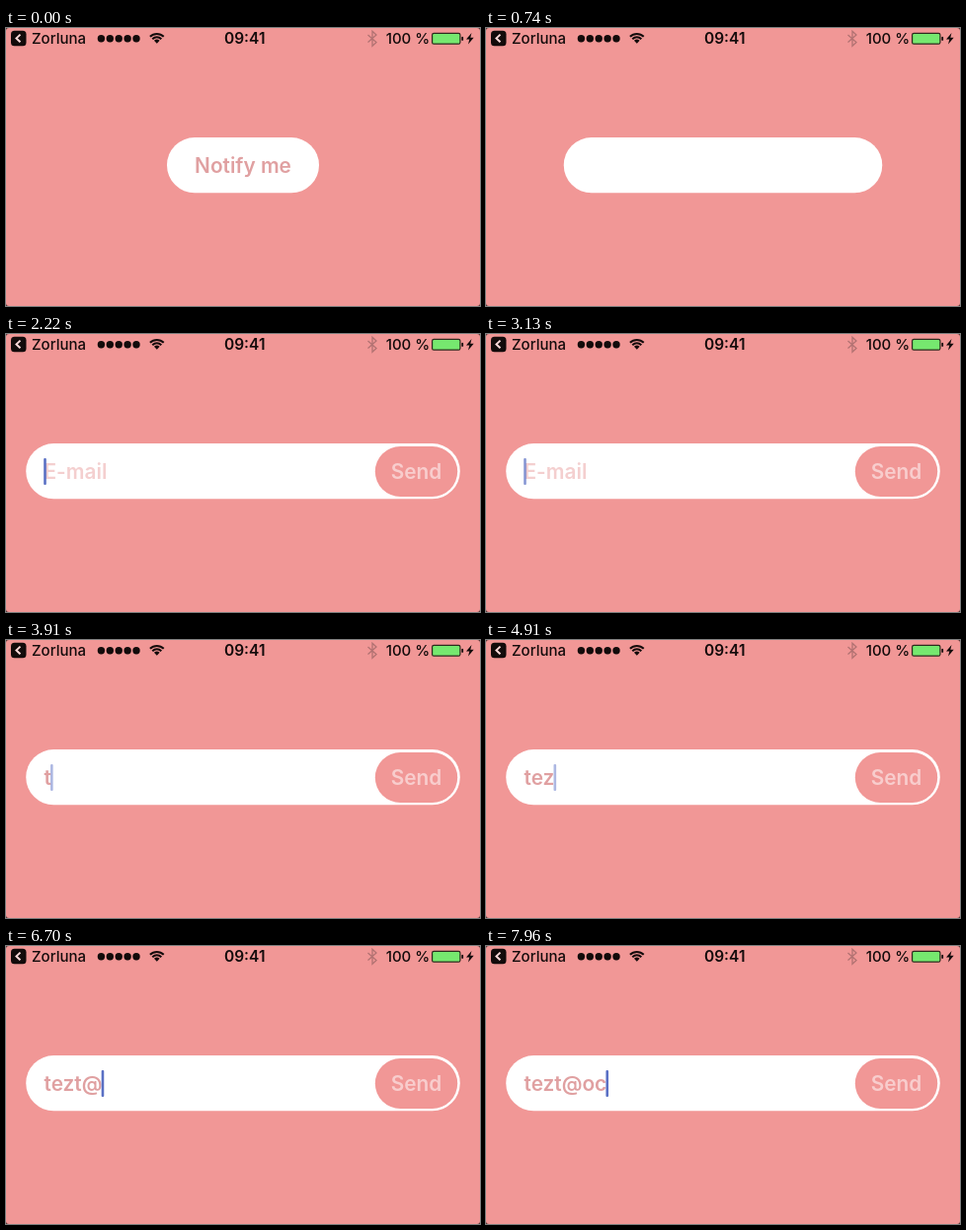
Write an HTML page with a canvas that moves like this. It is 480 px wide and 282 px high and loops after 8000 ms.

```html
<!DOCTYPE html>
<html lang="en">
<head>
<meta charset="utf-8">
<title>Notify me</title>
<style>
  html, body { margin: 0; width: 100%; height: 100%; overflow: hidden; background: #4a3030; }
  canvas { display: block; }
</style>
</head>
<body>
<canvas id="stage" width="480" height="282"></canvas>
<script>
const ctx = document.getElementById('stage').getContext('2d');
const LOOP = 8000;
const PINK = '#f19796';
const TEXT_PINK = '#e0a0a1';
const INK = '#130b0b';
const FIELD_X = 38.5;
const BASELINE = 147;
const FOCUS_TIME = 1250;

// Time of each keystroke and the character it adds
const KEYS = [[3360, 't'], [4190, 'e'], [4360, 'z'], [5200, 't'], [6270, '@'], [7000, 'o'], [7550, 'c']];

const progress = (t, from, to) => Math.min(1, Math.max(0, (t - from) / (to - from)));
const ease = p => p * p * (3 - 2 * p);
const mix = (a, b, p) => a + (b - a) * p;

function box(x, y, w, h, r, color) {
  ctx.beginPath();
  ctx.roundRect(x, y, w, h, r);
  ctx.fillStyle = color;
  ctx.fill();
}

function line(points, color, width) {
  ctx.beginPath();
  points.forEach(([x, y]) => ctx.lineTo(x, y));
  ctx.strokeStyle = color;
  ctx.lineWidth = width;
  ctx.stroke();
}

function label(text, x, y, size, weight, color, align = 'left') {
  ctx.font = `${weight} ${size}px Inter, sans-serif`;
  ctx.textAlign = align;
  ctx.fillStyle = color;
  ctx.fillText(text, x, y);
}

const formText = (text, x, y, color, align) => label(text, x, y, 20.8, 600, color, align);

function faded(alpha, draw) {
  if (alpha <= 0) return;
  ctx.save();
  ctx.globalAlpha *= alpha;
  draw();
  ctx.restore();
}

function drawWifi(x, y) {
  const [from, to] = [-Math.PI * 0.75, -Math.PI * 0.25];
  ctx.strokeStyle = ctx.fillStyle = INK;
  ctx.lineWidth = 2;
  for (const r of [6.4, 9.8]) {
    ctx.beginPath();
    ctx.arc(x, y, r, from, to);
    ctx.stroke();
  }
  ctx.beginPath();
  ctx.moveTo(x, y);
  ctx.arc(x, y, 4, from, to);
  ctx.fill();
}

function drawStatusBar() {
  box(5, 2.7, 15.5, 15.5, 3.5, INK);
  line([[14.5, 6.6], [10.5, 10.4], [14.5, 14.2]], '#fbdada', 2);
  label('Zorluna', 26, 16, 15, 500, INK);
  for (let i = 0; i < 5; i++) {
    ctx.beginPath();
    ctx.arc(96.4 + i * 8.9, 10.7, 3.7, 0, Math.PI * 2);
    ctx.fill();
  }
  drawWifi(152.8, 15.7);
  label('09:41', 241.7, 16, 15.5, 600, INK, 'center');
  line([[366.5, 7], [375, 14.5], [371, 18.3], [371, 3.2], [375, 7], [366.5, 14.5]], '#b27272', 1.3);
  label('100 %', 384.7, 16, 15, 500, INK);
  box(431, 4.8, 29.5, 12, 2.2, '#2c2a1c');
  box(432.2, 6, 27.1, 9.6, 1.2, '#76e86f');
  box(461.3, 8.8, 1.8, 4, 1, INK);
  ctx.beginPath();
  [[471.5, 5], [466, 11.6], [469.3, 11.6], [468, 16.5], [473.7, 9.8], [470.3, 9.8]]
    .forEach(([x, y]) => ctx.lineTo(x, y));
  ctx.fillStyle = INK;
  ctx.fill();
}

function drawSend(t) {
  const scale = mix(0.5, 1, ease(progress(t, 930, 1330)));
  faded(ease(progress(t, 930, 1300)), () => {
    ctx.translate(415.5, 139.5);
    ctx.scale(scale, scale);
    box(-41.7, -25.5, 83.4, 51, 25.5, PINK);
    formText('Send', 0, BASELINE - 139.5, '#f8cdcd', 'center');
  });
}

// Caret holds, fades out, rests and fades back in once a second
function caretAlpha(age) {
  const phase = age % 1000;
  return 1 - ease(progress(phase, 450, 650)) + ease(progress(phase, 750, 950));
}

function drawField(t) {
  const pressed = KEYS.filter(([time]) => time <= t);
  const typed = pressed.map(([, char]) => char).join('');
  if (typed) {
    formText(typed, FIELD_X, BASELINE, TEXT_PINK);
  } else {
    faded(progress(t, 1150, 1400), () => formText('E-mail', FIELD_X, BASELINE, '#f4cfcf'));
  }
  if (t < FOCUS_TIME) return;
  const lastChange = pressed.length ? pressed.at(-1)[0] : FOCUS_TIME;
  const x = FIELD_X + (typed ? ctx.measureText(typed).width : 0.5);
  faded(caretAlpha(t - lastChange), () => box(x - 0.8, 126, 2.6, 27, 1, '#5a70c4'));
}

function draw(t) {
  ctx.clearRect(0, 0, 480, 282);
  box(0, 0, 480, 282, 3, PINK);
  drawStatusBar();
  const grow = ease(progress(t, 500, 930));
  const width = mix(154, 439.5, grow);
  box(240 - width / 2, 111, width, 56.3, 28.1, '#fff');
  faded(1 - progress(t, 480, 680), () => formText('Notify me', 240, BASELINE, TEXT_PINK, 'center'));
  drawSend(t);
  drawField(t);
}

const start = performance.now();
function tick() {
  draw((performance.now() - start) % LOOP);
  requestAnimationFrame(tick);
}
tick();
</script>
</body>
</html>
```
